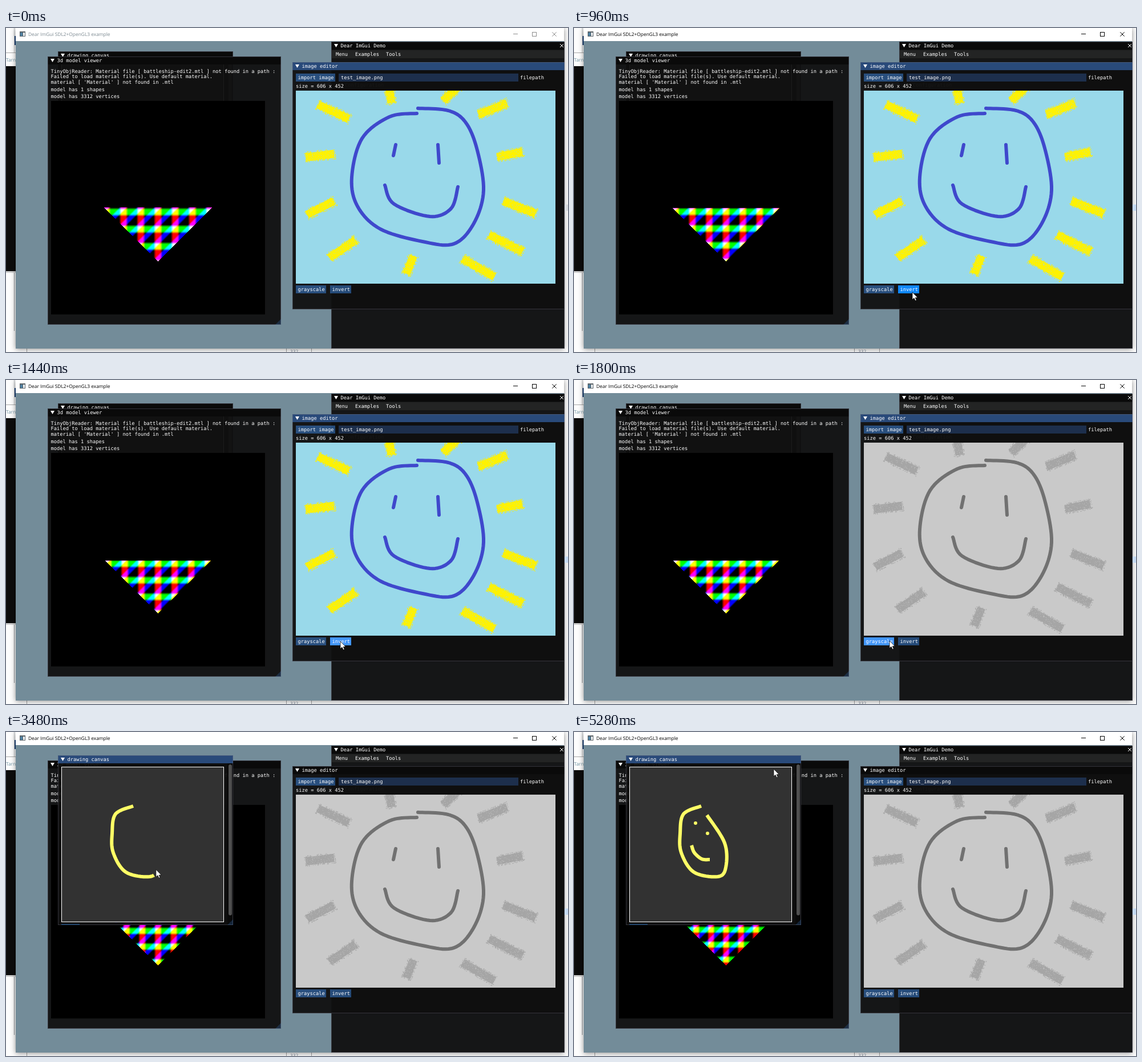
These frames come from a looping animation (985 by 569 pixels, 5.4 s). An HTML page with a canvas:

```html
<!DOCTYPE html>
<html lang="en">
<head>
<meta charset="utf-8">
<title>GUI demo</title>
<style>
  html, body { margin: 0; width: 985px; height: 569px; overflow: hidden; background: #fff; }
  canvas { display: block; }
</style>
</head>
<body>
<canvas id="stage" width="985" height="569"></canvas>
<script>
const ctx = document.getElementById('stage').getContext('2d');
const LOOP = 5400, STEP = 120;
const MONO = '8.72px "DejaVu Sans Mono", monospace';
const SANS = '8.4px "Open Sans", sans-serif';

// Event times in ms
const FOCUS = 480, INVERT = 1080, REVERT = 1320, GRAY = 1800, RAISE = 2400;
const HEAD = 2760, EYES = 4080, MOUTH = 4500, POINT_TIME = 135;

// Key points of the smooth pen strokes
const face = [[720,150], [672,156], [624,194], [606,262], [616,313], [656,353], [730,375],
  [785,379], [820,343], [837,285], [825,211], [805,165], [775,145], [722,141]];
const leftEye = [[683,205], [679,224]];
const rightEye = [[757,205], [759,237]];
const smile = [[664,276], [680,309], [743,331], [780,317], [792,279]];
const head = [[223,130], [192,144], [186,178], [188,212], [210,246], [252,254], [266,238], [264,195], [233,146]];
const eyes = [[213,160], [234,178]];
const mouth = [[206,199], [211,212], [224,223], [238,224]];

// Sun rays: middle and tilt in degrees; rays further out are longer
const rays = [[574,147,25], [673,115,81], [780,115,-42], [853,142,-22], [550,224,-7], [883,222,-11],
  [551,316,-27], [900,315,21], [590,388,-34], [708,416,111], [876,378,27], [828,421,30]];
const rayLength = (x, y) => 32 + .8 * (Math.hypot(x - 720, y - 262) - 152);

// Pointer stops as [time, x, y]
const follow = (points, start, step) => points.map((p, i) => [start + step * i, ...p]);
const hold = (from, to, ...p) => [[from, ...p], [to, ...p]];
const pointer = [
  [0, 930, 640], ...hold(840, 960, 593, 464), ...hold(1320, 1440, 586, 459),
  ...hold(1680, 1800, 553, 458), ...hold(2280, 2520, 214, 43),
  ...follow(head, HEAD - 60, POINT_TIME), ...follow(eyes, EYES, 240),
  ...follow(mouth, MOUTH - 25, POINT_TIME), ...hold(5280, LOOP, 350, 65)
];

function randomizer(seed) {
  return () => (seed = (seed * 16807) % 2147483647) / 2147483647;
}

function rect(x, y, w, h, color) {
  ctx.fillStyle = color;
  ctx.fillRect(x, y, w, h);
}

function frame(x, y, w, h, color) {
  ctx.strokeStyle = color;
  ctx.lineWidth = 1;
  ctx.strokeRect(x + .5, y + .5, w - 1, h - 1);
}

function line(color, width, ...points) {
  ctx.strokeStyle = color;
  ctx.lineWidth = width;
  ctx.beginPath();
  points.forEach(p => ctx.lineTo(...p));
  ctx.stroke();
}

function polygon(color, ...points) {
  ctx.fillStyle = color;
  ctx.beginPath();
  points.forEach(p => ctx.lineTo(...p));
  ctx.closePath();
  ctx.fill();
}

function text(string, x, middle, color = '#fff', font = MONO) {
  ctx.font = font;
  ctx.fillStyle = color;
  ctx.fillText(string, x, middle + 3);
}

function cross(x, y, r, color) {
  line(color, 1, [x - r, y - r], [x + r, y + r]);
  line(color, 1, [x - r, y + r], [x + r, y - r]);
}

// Catmull-Rom position at parameter u
function curveAt(points, u) {
  const last = points.length - 1, i = Math.min(Math.floor(u), last - 1), f = u - i;
  const [a, b, c, d] = [i - 1, i, i + 1, i + 2].map(k => points[Math.max(0, Math.min(last, k))]);
  return [0, 1].map(k => b[k] + f / 2 * (c[k] - a[k] +
    f * (2 * a[k] - 5 * b[k] + 4 * c[k] - d[k] + f * (3 * (b[k] - c[k]) + d[k] - a[k]))));
}

function curve(points, color, u = points.length - 1) {
  const end = Math.min(u, points.length - 1);
  if (end <= 0) return;
  const path = [];
  for (let s = 0; s < end; s += .1) path.push(curveAt(points, s));
  line(color, 6, ...path, curveAt(points, end));
}

function drawDesktop(active) {
  rect(0, 0, 985, 569, '#fdfdfd');
  rect(14, 0, 1, 44, '#c4c8cc');
  rect(15, 14, 2, 16, '#1f4478');
  rect(0, 43, 17, 1, '#a8a8a8');
  text('Tarn', 0, 56, '#7296a6', SANS);
  rect(0, 67, 17, 360, '#0c0c0c');
  rect(0, 427, 17, 3, '#d0d0d0');
  rect(14, 430, 1, 102, '#8c9298');
  for (const x of [36, 491, 535]) rect(x, 563, 1, 6, '#a0a0a0');

  ctx.save();
  ctx.shadowColor = 'rgba(0,0,0,.45)';
  ctx.shadowBlur = 9;
  ctx.shadowOffsetY = 1;
  rect(17, 0, 961, 563, '#738c99');
  ctx.restore();
  text('332', 498, 568, '#6a7480', SANS);
  rect(979, 310, 6, 11, active ? '#c6dbf5' : '#d8dbe0');

  rect(17, 0, 961, 23, '#fff');
  const ink = active ? '#000' : '#8c8c8c';
  rect(24, 6, 10, 9, '#5d6468');
  rect(25, 8, 4, 6, '#4d7fa0');
  rect(30, 8, 3, 6, '#eef2f4');
  text('Dear ImGui SDL2+OpenGL3 example', 39, 11, active ? '#000' : '#7d8a92', SANS);
  rect(889, 10, 8, 1, ink);
  frame(922, 7, 8, 8, ink);
  cross(961, 11, 3.7, ink);
}

function panel(x, y, w, h, title, focused) {
  rect(x, y, w, h, 'rgba(15,15,15,.94)');
  rect(x, y, w, 14, focused ? '#294a7a' : '#0a0a0a');
  frame(x, y, w, h, 'rgba(110,110,128,.4)');
  polygon('#fff', [x + 5, y + 4], [x + 12, y + 4], [x + 8.5, y + 10]);
  text(title, x + 16.5, y + 7);
}

function grip(x, y) {
  polygon('rgba(66,150,250,.2)', [x, y], [x - 10, y], [x, y - 10]);
}

function button(label, x, y, w, color = 'rgba(66,150,250,.45)') {
  rect(x, y, w, 14, color);
  text(label, x + 3.5, y + 7);
}

function drawDemo() {
  panel(570, 24, 409, 539, 'Dear ImGui Demo', false);
  rect(571, 39, 407, 14, '#232424');
  text('Menu', 578, 46);
  text('Examples', 612, 46);
  text('Tools', 666, 46);
  cross(974, 31, 3, '#fff');
  text('Configuration', 594, 100, 'rgba(255,255,255,.5)');
}

function drawSun(mode) {
  const tint = (...rgb) => {
    const mean = Math.round((rgb[0] + rgb[1] + rgb[2]) / 3);
    return `rgb(${rgb.map(c => mode === 'gray' ? mean : mode === 'invert' ? 255 - c : c)})`;
  };
  const sky = tint(153, 217, 234), pen = tint(63, 72, 204), spray = tint(255, 242, 0);
  const random = randomizer(77);
  ctx.save();
  ctx.beginPath();
  ctx.rect(508, 110, 455, 339);
  ctx.clip();
  rect(508, 110, 455, 339, sky);
  for (const [x, y, tilt] of rays) {
    const length = rayLength(x, y);
    ctx.save();
    ctx.translate(x, y);
    ctx.rotate(tilt * Math.PI / 180);
    rect(-length / 2, -7, length, 14, spray);
    const speckle = (count, color, size) => {
      for (let i = 0; i < count; i++)
        rect((random() - .5) * (length + 4), random() * 19 - 10, size, size, color);
    };
    speckle(length * 5, spray, 1.3);
    speckle(length * 1.6, sky, .8);
    ctx.restore();
  }
  ctx.lineCap = ctx.lineJoin = 'round';
  for (const points of [face, leftEye, rightEye, smile]) curve(points, pen);
  ctx.restore();
}

function drawEditor(t) {
  const between = (from, to) => t >= from && t < to;
  panel(502, 60, 477, 434, 'image editor', t < RAISE);
  button('import image', 508, 80, 69);
  rect(583, 80, 315, 14, '#1d2f4c');
  text('test_image.png', 587, 87);
  text('filepath', 901, 87);
  text('size = 606 x 452', 508, 102);
  drawSun(t >= GRAY ? 'gray' : between(INVERT, REVERT) ? 'invert' : 'normal');

  // A button is pressed just before its effect shows
  const pressed = [INVERT, REVERT, GRAY].some(time => between(time - STEP, time));
  const color = pressed ? '#0f87fa' : '#4296fa';
  button('grayscale', 508, 452, 53, between(1560, 1920) ? color : undefined);
  button('invert', 568, 452, 37, between(840, 1560) ? color : undefined);
}

// Triangle with red, green and blue stripes that slide and tighten
function drawModel(t) {
  const k = t / 5280, period = 30.2 - 4 * k, top = Math.round(315 + t * .0011);
  const image = ctx.createImageData(190, 95);
  const stripe = d => 255 * (.08 + 1.25 * Math.cos(d * 2 * Math.PI / period));
  for (let row = 0; row < 95; row++) for (let col = 0; col < 190; col++) {
    const x = 171 + col, y = 315 + row;
    const inside = y >= top && Math.abs(x - 266) <= 409 - y;
    const rgb = [stripe(x - 266), stripe(y - 383 + 10 * k), stripe(x + y - 671 + 15 * k)];
    image.data.set([...rgb.map(c => inside ? c : 0), 255], (row * 190 + col) * 4);
  }
  ctx.putImageData(image, 171, 315);
}

function drawViewer(t) {
  panel(73, 50, 409, 471, '3d model viewer', false);
  text('TinyObjReader: Material file [ battleship-edit2.mtl ] not found in a path :', 78.5, 75.5);
  text('Failed to load material file(s). Use default material.', 78.5, 85);
  text("material [ 'Material' ] not found in .mtl", 78.5, 95);
  text('model has 1 shapes', 78.5, 107.5);
  text('model has 3312 vertices', 78.5, 120);
  rect(79, 128, 375, 375, '#000');
  drawModel(t);
  grip(482, 521);
}

function drawCanvas(t) {
  panel(91, 41, 307, 298, 'drawing canvas', t >= RAISE);
  rect(97, 61, 285, 273, '#323232');
  frame(97, 61, 285, 273, '#fff');
  rect(388, 55, 9, 283, 'rgba(5,5,5,.53)');
  ctx.fillStyle = '#4f4f4f';
  ctx.beginPath();
  ctx.roundRect(390, 57, 6, 265, 3);
  ctx.fill();
  rect(97, 337, 32, 2, '#24486f');
  grip(398, 339);

  const ink = '#ffff66';
  curve(head, ink, (t - HEAD) / POINT_TIME);
  curve(mouth, ink, (t - MOUTH) / POINT_TIME);
  eyes.forEach(([x, y], i) => {
    if (t < EYES + 240 * i) return;
    ctx.fillStyle = ink;
    ctx.beginPath();
    ctx.arc(x, y, 3, 0, 7);
    ctx.fill();
  });
}

function drawPointer(t) {
  const i = pointer.findIndex(p => p[0] > t);
  const [t0, x0, y0] = pointer[i - 1], [t1, x1, y1] = pointer[i], f = (t - t0) / (t1 - t0);
  ctx.save();
  ctx.translate(x0 + (x1 - x0) * f, y0 + (y1 - y0) * f);
  polygon('#fff', [0, 0], [0, 13], [3, 10.3], [5.2, 15], [7.2, 14], [5.2, 9.7], [9.3, 9.5]);
  ctx.strokeStyle = '#000';
  ctx.lineWidth = .7;
  ctx.stroke();
  ctx.restore();
}

function draw(t) {
  drawDesktop(t >= FOCUS);
  drawDemo();
  const stack = t < RAISE ? [drawCanvas, drawViewer] : [drawViewer, drawCanvas];
  for (const layer of [...stack, drawEditor, drawPointer]) layer(t);
}

ctx.textRendering = 'geometricPrecision';
const start = performance.now();
let shown = -1;
function tick() {
  const t = Math.floor((performance.now() - start) % LOOP / STEP) * STEP;
  if (t !== shown) draw(shown = t);
  requestAnimationFrame(tick);
}
tick();
</script>
</body>
</html>
```
